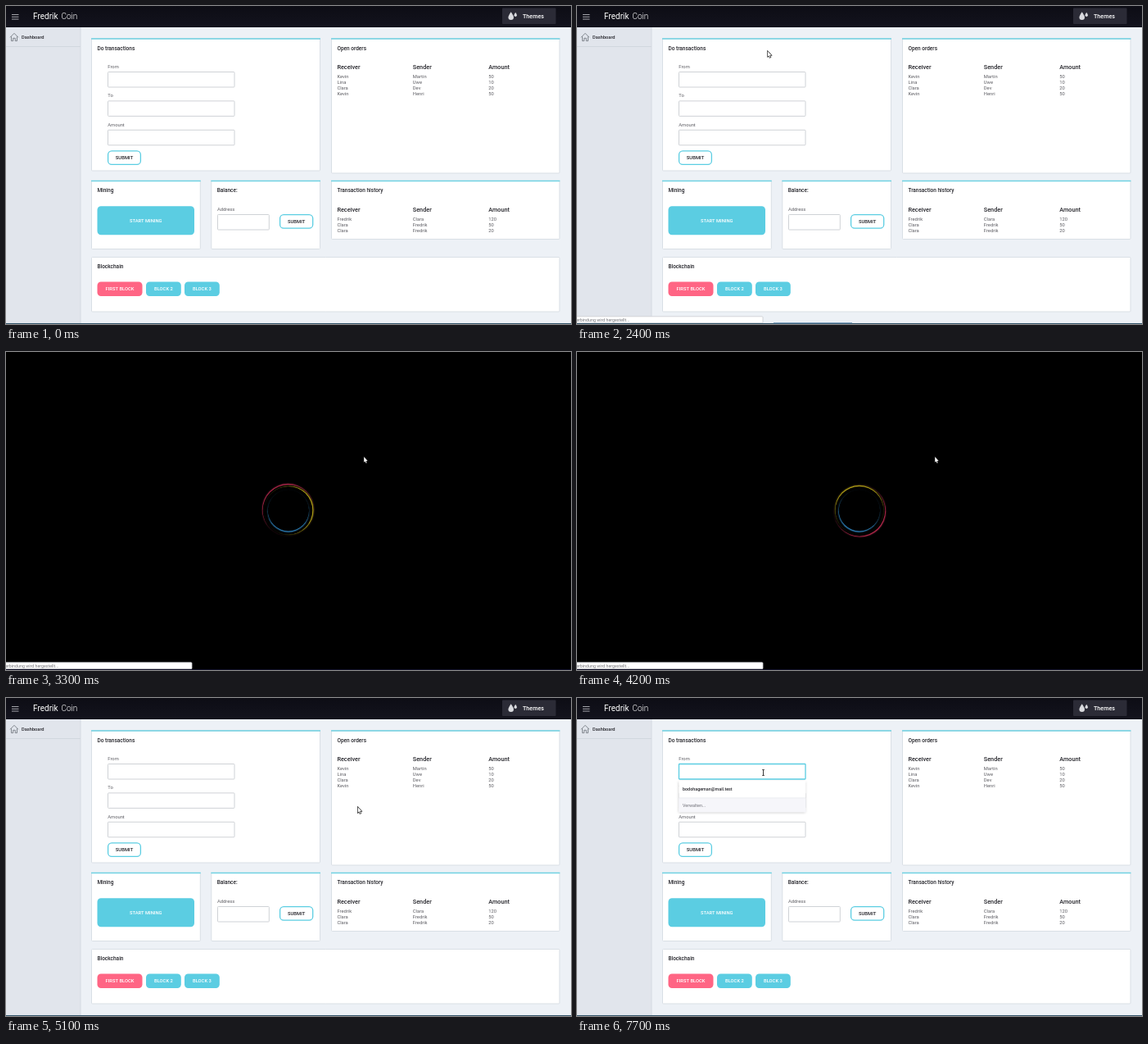
Write an HTML page with a canvas that moves like this. It is 690 by 388 pixels and loops after 8 s.

```html
<!DOCTYPE html>
<html lang="en">
<head>
<meta charset="utf-8">
<title>Coin dashboard</title>
<style>
  html, body { margin: 0; width: 100%; height: 100%; overflow: hidden; background: #000; }
  canvas { display: block; width: 100%; height: 100%; }
</style>
</head>
<body>
<canvas id="stage" width="690" height="388"></canvas>
<script>
const ctx = document.getElementById('stage').getContext('2d');
const W = 690, H = 388, LOOP = 8000, STEP = 100;
const CYAN = '#5bcde2', EDGE = '#d9dfe5', INK = '#26262c', SOFT = '#5c5c62';
const FONT = 'Roboto, "Open Sans", sans-serif';

const LOAD_START = 2440, BLACK_FROM = 2500, BARE_FROM = 4300, READY = 4400;
const STATUS_FROM = 2200, STATUS_TO = 4700;
const FOCUS_FROM = 6000, MENU_FROM = 6070, BLINK = 530;

// Pointer tip positions: time, x, y
const ENTER = [[1100, 533, 128], [1300, 390, 88], [1500, 137, 9]];
const WORK = [[2000, 150, 1], [2400, 233, 55.3], [2500, 255.3, 60.8], [2800, 437.2, 128],
  [5000, 437.2, 128], [5300, 415, 144], [5600, 320, 118], [5900, 241, 94], [6000, 227.5, 91]];

function rect(x, y, w, h, fill) {
  ctx.fillStyle = fill;
  ctx.fillRect(x, y, w, h);
}

function box(x, y, w, h, r, fill, line, width = 1) {
  ctx.beginPath();
  ctx.roundRect(x, y, w, h, r);
  if (fill) { ctx.fillStyle = fill; ctx.fill(); }
  if (line) { ctx.strokeStyle = line; ctx.lineWidth = width; ctx.stroke(); }
}

function text(str, x, y, size, color = INK, weight = 400, align = 'left') {
  ctx.font = `${weight} ${size}px ${FONT}`;
  ctx.fillStyle = color;
  ctx.textAlign = align;
  ctx.fillText(str, x, y);
}

function path(points, line, width, fill) {
  ctx.beginPath();
  points.forEach(([x, y]) => ctx.lineTo(x, y));
  if (fill) ctx.closePath();
  ctx.strokeStyle = line;
  ctx.lineWidth = width;
  ctx.stroke();
  if (fill) { ctx.fillStyle = fill; ctx.fill(); }
}

function card(x, y, right, bottom, title, accent = true) {
  box(x + .5, y + .5, right - x - 1, bottom - y - 1, 1, '#fff', EDGE);
  if (accent) rect(x, y - .3, right - x, 1.5, '#70d1e2');
  if (title) text(title, x + 7.4, y + 14.3, 6.5, INK, 500);
}

function input(x, y, right, focused) {
  box(x + .5, y + .5, right - x - 1, 18.5, .8, '#fff', focused ? CYAN : '#cfd2d6', focused ? 1.3 : 1);
}

function outlineButton(x, y, right, label) {
  box(x + .6, y + .6, right - x - 1.2, 16.6, 4.5, '#fff', CYAN, 1.3);
  if (label) text(label, (x + right) / 2, y + 10.9, 5.9, INK, 500, 'center');
}

function fillButton(x, y, right, h, label, color = CYAN) {
  box(x, y, right - x, h, 4.5, color);
  if (label) text(label, (x + right) / 2, y + h / 2 + 2.1, 5.8, '#fff', 500, 'center');
}

function table(top, rows) {
  const cols = [404.4, 496.8, 589.2];
  ['Receiver', 'Sender', 'Amount'].forEach((h, i) => text(h, cols[i], top, 7.3, INK, 500));
  rows.forEach((row, r) => row.forEach((cell, i) => text(cell, cols[i], top + 10.8 + r * 7.15, 5.8, SOFT)));
}

function drop(x, y, r) {
  ctx.beginPath();
  ctx.moveTo(x, y - r * 2);
  ctx.quadraticCurveTo(x + r, y - r * .6, x + r, y);
  ctx.arc(x, y, r, 0, Math.PI);
  ctx.quadraticCurveTo(x - r, y - r * .6, x, y - r * 2);
  ctx.fillStyle = '#d9dade';
  ctx.fill();
}

function frameOfPage(bare) {
  rect(0, 0, W, H, '#edf1f6');
  rect(0, 26, 91, H - 26, '#e1e5ec');
  rect(90.5, 26, 1, H - 26, '#d5dbe2');
  rect(0, 49, 91, 1, '#d1d7de');
  const g = ctx.createLinearGradient(0, 0, 0, 26);
  g.addColorStop(0, '#0d0d15');
  g.addColorStop(1, '#13131d');
  rect(0, 0, W, 26, g);
  if (bare) box(611, 2.5, 60.5, 19.5, 1, '#2a2a35');
  else box(606, 2.5, 65.5, 19.5, 1, '#2b2b36');
}

function header() {
  [10, 12.8, 15.6].forEach(y => rect(7, y, 8.5, .9, '#b5b6bc'));
  text('Fredrik', 33, 15.6, 10, '#fff', 400);
  text('Coin', 67.5, 15.6, 10, '#fff', 300);
  drop(616.7, 13.8, 3.3);
  drop(622.2, 11.2, 1.7);
  text('Themes', 631, 14.8, 7.2, '#fff', 500);
  path([[5, 38.3], [10, 33.3], [15, 38.3]], '#777c84', .9);
  path([[6.5, 37.3], [6.5, 42.6], [8.7, 42.6], [8.7, 39.3], [11.3, 39.3], [11.3, 42.6], [13.5, 42.6], [13.5, 37.3]], '#777c84', .9);
  text('Dashboard', 19, 39.7, 5.7, INK, 500);
}

function barePage() {
  frameOfPage(true);
  card(104, 39.5, 385, 201.5);
  card(397.5, 39.5, 680, 204);
  card(104, 213, 238, 297);
  card(250.5, 213, 385, 297);
  card(397.5, 213, 680, 264);
  card(104, 306, 680, 344, '', false);
  [80, 115.5, 151].forEach(y => input(124, y, 280.5));
  outlineButton(124, 176.2, 167);
  fillButton(111.5, 244.3, 230.5, 35);
  input(258.5, 254, 322.5);
  outlineButton(334.8, 254, 377.5);
  rect(92, 365, 556, H - 365, '#fff');
  rect(92, 364.5, 556, 1, EDGE);
  rect(648, 26, 42, H - 26, '#fff');
  rect(647.3, 26, .8, H - 26, '#e3e7ec');
  box(656, 124.5, 17, 7.2, 3.6, '#f0f2f7');
  ctx.beginPath();
  ctx.arc(660.4, 128, 4.4, 0, Math.PI * 2);
  ctx.fillStyle = '#6e9bfb';
  ctx.fill();
}

function fullPage(t) {
  frameOfPage(false);
  header();

  card(104, 39.5, 384, 201.5, 'Do transactions');
  ['From', 'To', 'Amount'].forEach((label, i) => {
    text(label, 124.3, 75.7 + i * 35.4, 5.8, SOFT);
    input(124, 80 + i * 35.4, 279.5, i === 0 && t >= FOCUS_FROM);
  });
  outlineButton(124, 176.2, 165, 'SUBMIT');

  card(397, 39.5, 676.5, 204.5, 'Open orders');
  table(77, [['Kevin', 'Martin', 50], ['Lina', 'Uwe', 10], ['Clara', 'Dev', 20], ['Kevin', 'Henri', 50]]);

  card(104, 213, 237.8, 297, 'Mining');
  fillButton(111.5, 244.3, 230, 35, 'START MINING');

  card(250.3, 213, 384, 297, 'Balance:');
  text('Address', 258, 249.7, 5.8, SOFT);
  input(258, 254, 321.8);
  outlineButton(334, 254, 375.3, 'SUBMIT');

  card(397, 213, 676.5, 285, 'Transaction history');
  table(250.7, [['Fredrik', 'Clara', 120], ['Clara', 'Fredrik', 50], ['Clara', 'Fredrik', 20]]);

  card(104, 306, 676.5, 373.5, 'Blockchain', false);
  fillButton(111.5, 336.5, 166.5, 17.5, 'FIRST BLOCK', '#ff6584');
  fillButton(171, 336.5, 213.8, 17.5, 'BLOCK 2');
  fillButton(218, 336.5, 260.8, 17.5, 'BLOCK 3');

  if (t >= MENU_FROM) menu(t);
}

function menu(t) {
  ctx.save();
  ctx.shadowColor = 'rgba(0,0,0,.3)';
  ctx.shadowBlur = 3;
  ctx.shadowOffsetY = 1;
  rect(124.3, 101, 155, 38.3, '#fff');
  ctx.restore();
  rect(124.3, 122, 155, 17.3, '#f6f6fa');
  rect(124.3, 121.6, 155, .7, '#e4e5ea');
  text('bodohageman@mail.test', 129, 113.2, 5.4, INK, 500);
  text('Verwalten...', 129, 132.8, 5.4, '#707078');
  if (Math.floor((t - MENU_FROM) / BLINK) % 2 === 0) rect(131.3, 86, .9, 8, '#333');
}

// Crescent: a soft shadow thrown by a disc, visible only outside it
function crescent(radius, turn, color) {
  const cx = 344.9, cy = 193.3, shift = 1.25, away = 2000;
  const a = Math.PI / 2 + turn * Math.PI * 2;
  ctx.save();
  ctx.globalAlpha = .82;
  ctx.beginPath();
  ctx.rect(0, 0, W, H);
  ctx.arc(cx, cy, radius, 0, Math.PI * 2);
  ctx.clip('evenodd');
  ctx.shadowColor = color;
  ctx.shadowBlur = 1.4;
  ctx.shadowOffsetX = away;
  ctx.beginPath();
  ctx.arc(cx + shift * Math.cos(a) - away, cy + shift * Math.sin(a), radius, 0, Math.PI * 2);
  ctx.fillStyle = '#000';
  ctx.fill();
  ctx.restore();
}

function loader(t) {
  const s = (t - LOAD_START) / 1000, base = s / 2;
  rect(0, 0, W, H, '#000');
  crescent(31.4, base, 'rgb(255,56,106)');
  crescent(29.4, base + s / 3, 'rgb(255,228,32)');
  crescent(25.2, base + s / 1.5, 'rgb(61,175,255)');
}

function statusBar() {
  box(-2, 378.8, 229, 8, 1, '#fff', '#c9cbd0', .8);
  text('Verbindung wird hergestellt...', -4, 385.2, 5.3, '#77777c');
}

function along(keys, t) {
  if (t < keys[0][0]) return null;
  const i = keys.findIndex(k => k[0] > t);
  if (i < 0) return keys[keys.length - 1].slice(1);
  const [t0, x0, y0] = keys[i - 1], [t1, x1, y1] = keys[i];
  const p = (t - t0) / (t1 - t0);
  return [x0 + (x1 - x0) * p, y0 + (y1 - y0) * p];
}

function pointer(t) {
  const pos = t < 1600 ? along(ENTER, t) : along(WORK, t);
  if (!pos) return;
  const [x, y] = pos;
  if (t > 5000 && x > 124 && x < 279 && y > 80 && y < 100) {
    rect(x - .4, y - 3.4, .9, 7, '#222');
    rect(x - 1.5, y - 3.8, 3, .7, '#222');
    rect(x - 1.5, y + 3.2, 3, .7, '#222');
    return;
  }
  const shape = [[0, 0], [0, 6.4], [1.4, 5.2], [2.4, 7.6], [3.4, 7.2], [2.4, 4.9], [4.3, 4.7]];
  path(shape.map(([a, b]) => [x + a, y + b]), '#111', 1.3, '#fff');
}

function draw(t) {
  const dark = t >= BLACK_FROM && t < BARE_FROM;
  const loading = t >= STATUS_FROM && t < STATUS_TO;
  if (dark) loader(t);
  else if (t >= BARE_FROM && t < READY) barePage();
  else fullPage(t);
  if (loading) statusBar();
  rect(0, 387, W, 1, dark ? '#101028' : '#34566b');
  if (loading && !dark) rect(240, 386.3, 96, 1, '#5d87ab');
  pointer(t);
}

const start = performance.now();
function tick() {
  const t = (performance.now() - start) % LOOP;
  draw(Math.floor(t / STEP) * STEP);
  requestAnimationFrame(tick);
}
tick();
</script>
</body>
</html>
```
